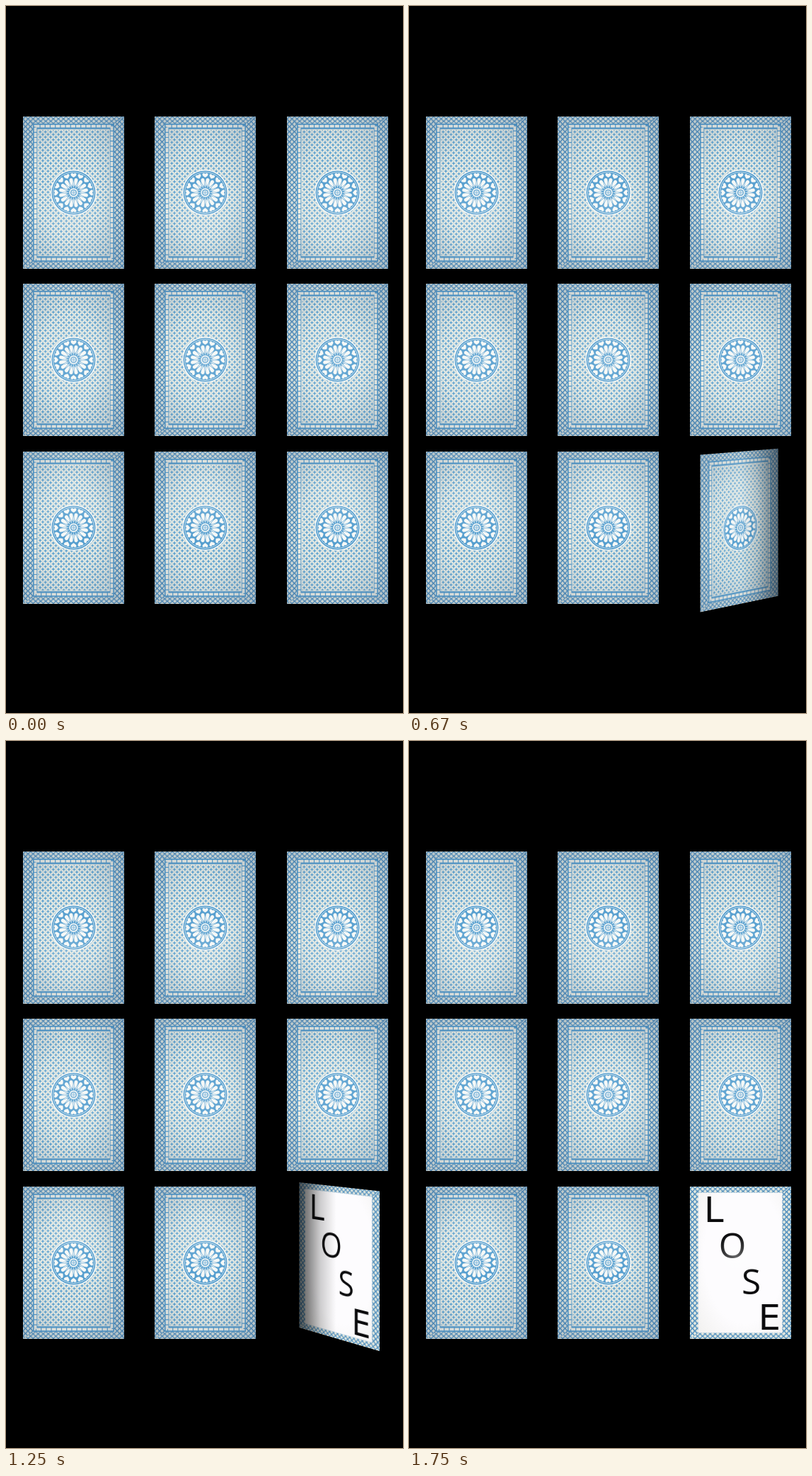
These frames come from a looping animation (561x998 px, 1790 ms). An HTML page:

```html
<!DOCTYPE html>
<html lang="en">
<head>
<meta charset="utf-8">
<title>Pick a card</title>
<style>
html, body { margin: 0; width: 100%; height: 100%; overflow: hidden; background: #000; }
#stage { position: absolute; left: 0; top: 0; width: 561px; height: 998px; overflow: hidden;
  perspective: 1110px; perspective-origin: 280.5px 499px; }
.card { position: absolute; width: 143px; height: 215px; }
.card svg { display: block; }
#flip { transform-style: preserve-3d; }
.face { position: absolute; inset: 0; overflow: hidden; backface-visibility: hidden; }
.front { transform: rotateY(180deg); }
.shade, .dim, #sheen { position: absolute; inset: 0; opacity: 0; }
.shade { background: linear-gradient(270deg, rgba(0,0,0,.9), rgba(0,0,0,.68) 12%, rgba(0,0,0,.28) 28%, transparent 48%); }
.front .shade { transform: scaleX(-1); }
.dim { background: #000; }
</style>
</head>
<body>
<div id="stage"></div>
<svg width="0" height="0" style="position:absolute">
  <defs>
    <pattern id="tile" width="7.4" height="7.4" patternUnits="userSpaceOnUse" x="20.6" y="18">
      <rect width="7.4" height="7.4" fill="#f3f1e4"/>
      <g id="stars" fill="#5ba0cf"></g>
    </pattern>
    <pattern id="weaveH" width="7.15" height="6.6" patternUnits="userSpaceOnUse">
      <rect width="7.15" height="6.6" fill="#4a8bbd"/>
      <path id="lozH" fill="#e8ebe0"/>
    </pattern>
    <pattern id="weaveV" width="7" height="7.15" patternUnits="userSpaceOnUse">
      <rect width="7" height="7.15" fill="#4a8bbd"/>
      <path id="lozV" fill="#e4e9e0"/>
    </pattern>
    <radialGradient id="vignette" cx=".46" cy=".5" r=".75">
      <stop offset=".4" stop-color="#4c6c8c" stop-opacity="0"/>
      <stop offset="1" stop-color="#4c6c8c" stop-opacity=".36"/>
    </radialGradient>
    <radialGradient id="glow">
      <stop offset="0" stop-color="#fff" stop-opacity=".2"/>
      <stop offset="1" stop-color="#fff" stop-opacity="0"/>
    </radialGradient>
    <radialGradient id="paper" cx=".55" cy=".45" r=".8">
      <stop offset=".6" stop-color="#fdfcfe"/>
      <stop offset="1" stop-color="#f1f0ee"/>
    </radialGradient>
    <g id="weave">
      <rect width="143" height="215" fill="url(#weaveV)"/>
      <path d="M0 0H143L129 10H14ZM0 215H143L129 205H14Z" fill="url(#weaveH)"/>
    </g>
    <g id="back">
      <use href="#weave"/>
      <rect x="14" y="10" width="115" height="195" fill="#4f98ca"/>
      <rect x="17.5" y="13.7" width="108" height="187.6" fill="none" stroke="#f1f0e6" stroke-width="3.8" stroke-dasharray="6 1.2"/>
      <rect x="20.6" y="18" width="101.8" height="179" fill="url(#tile)"/>
      <rect x="20.9" y="18.3" width="101.2" height="178.4" fill="none" stroke="#f3f1e4" stroke-width="1"/>
      <g id="medal" transform="translate(71.5 107.5)"></g>
      <rect width="143" height="215" fill="url(#vignette)"/>
    </g>
  </defs>
</svg>
<script>
const $ = id => document.getElementById(id);
const BLUE = '#4c99cc', WHITE = '#f6f8f6';

// Four-pointed star with concave sides
const star = (x, y, r) =>
  `<path d="M${x} ${y - r}Q${x} ${y} ${x + r} ${y}Q${x} ${y} ${x} ${y + r}` +
  `Q${x} ${y} ${x - r} ${y}Q${x} ${y} ${x} ${y - r}Z"/>`;
$('stars').innerHTML = [[0, 0], [7.4, 0], [0, 7.4], [7.4, 7.4], [3.7, 3.7]]
  .map(([x, y]) => star(x, y, 3.8)).join('');

const lozenge = (x, y, rx, ry) => `M${x - rx} ${y}L${x} ${y - ry}L${x + rx} ${y}L${x} ${y + ry}Z`;
const weave = (w, h, rx, ry) => [[0, 0], [w, 0], [0, h], [w, h], [w / 2, h / 2]]
  .map(([x, y]) => lozenge(x, y, rx, ry)).join('');
$('lozH').setAttribute('d', weave(7.15, 6.6, 2.7, 2.3));
$('lozV').setAttribute('d', weave(7, 7.15, 2.4, 2.7));

const ring = (n, shape, offset = 0) => Array.from({ length: n }, (_, i) =>
  `<g transform="rotate(${(i + offset) * 360 / n})">${shape}</g>`).join('');
const disc = (r, fill, extra = '') => `<circle r="${r}" fill="${fill}" ${extra}/>`;
$('medal').innerHTML =
  disc(32.6, WHITE) + disc(31, BLUE) +
  disc(29, 'none', `stroke="${WHITE}" stroke-width=".7"`) +
  ring(16, `<path d="M0 -21.5Q-4.8 -24.4 -3.9 -26.6Q-2 -28.4 0 -26.4Q2 -28.4 3.9 -26.6Q4.8 -24.4 0 -21.5Z" fill="${WHITE}"/>`) +
  ring(16, `<path d="M0 -9Q-3.4 -17 -2.2 -19.6Q0 -22 2.2 -19.6Q3.4 -17 0 -9Z" fill="${WHITE}"/>`, .5) +
  ring(16, `<path d="M0 -6L-.7 -11L0 -17L.7 -11Z" fill="${WHITE}"/>`) +
  disc(6.2, WHITE) + disc(4.6, BLUE) + disc(3.2, WHITE) +
  ring(8, `<circle cy="-2.2" r=".55" fill="${BLUE}"/>`) + disc(1, BLUE);

const svg = body => `<svg width="143" height="215" viewBox="0 0 143 215">${body}</svg>`;
const back = row => svg('<use href="#back"/>' +
  `<ellipse cx="71" cy="${[135, 108, 72][row]}" rx="62" ry="80" fill="url(#glow)"/>`);
const letter = (ch, x, y, font, anchor = 'start') =>
  `<text x="${x}" y="${y}" font-size="49.5" font-family="${font}, sans-serif" text-anchor="${anchor}" fill="#0b0b0d">${ch}</text>`;
const front = svg('<use href="#weave"/>' +
  '<rect x="11.5" y="8.5" width="119" height="198" fill="url(#paper)"/>' +
  letter('L', 20, 50.5, "'DejaVu Sans'") +
  letter('O', 60, 101.5, "'Open Sans'", 'middle') +
  letter('S', 86.5, 151.8, "'Open Sans'", 'middle') +
  letter('E', 96.7, 202, "'DejaVu Sans'"));

const overlays = '<div class="shade"></div><div class="dim"></div>';
let html = '';
for (let i = 0; i < 9; i++) {
  const row = Math.floor(i / 3), col = i % 3;
  const place = `style="left:${24 + col * 186.25}px;top:${155.8 + row * 236.35}px"`;
  html += i < 8 ? `<div class="card" ${place}>${back(row)}</div>` :
    `<div class="card" id="flip" ${place}>` +
    `<div class="face">${back(row)}${overlays}</div>` +
    `<div class="face front">${front}<div id="sheen"></div>${overlays}</div></div>`;
}
$('stage').innerHTML = html;

const flip = $('flip'), sheen = $('sheen');
const shades = flip.querySelectorAll('.shade'), dims = flip.querySelectorAll('.dim');
const clamp = (v, lo = 0, hi = 1) => Math.min(hi, Math.max(lo, v));

// Half turn of the last card, eased in and out; times in steps
const LOOP = 1790, STEPS = 43, TURN_START = 6, TURN_LENGTH = 36.7;
const angleAt = step =>
  90 * (1 - Math.cos(Math.PI * clamp((step - TURN_START) / TURN_LENGTH)));

function draw(ms) {
  const step = Math.min(STEPS - 1, Math.floor((ms % LOOP + 4) * STEPS / LOOP));
  const angle = angleAt(step), sin = Math.sin(angle * Math.PI / 180);
  flip.style.transform = `rotateY(${angle}deg)`;
  shades.forEach(s => s.style.opacity = clamp((sin - .12) * 1.1, 0, .9));
  dims.forEach(d => d.style.opacity = clamp((sin - .75) * 1.4, 0, .35));
  // Reflected light slides from the third letter to the second
  const p = clamp((angle - 156) / 24);
  sheen.style.opacity = clamp((angle - 140) / 30);
  sheen.style.background = `radial-gradient(circle at ${92 - 28 * p}px ${120 - 22 * p}px, ` +
    'rgba(255,255,255,.36), rgba(255,255,255,0) 32px)';
}

const start = performance.now();
function tick() {
  draw(performance.now() - start);
  requestAnimationFrame(tick);
}
draw(0);
requestAnimationFrame(tick);
</script>
</body>
</html>
```
